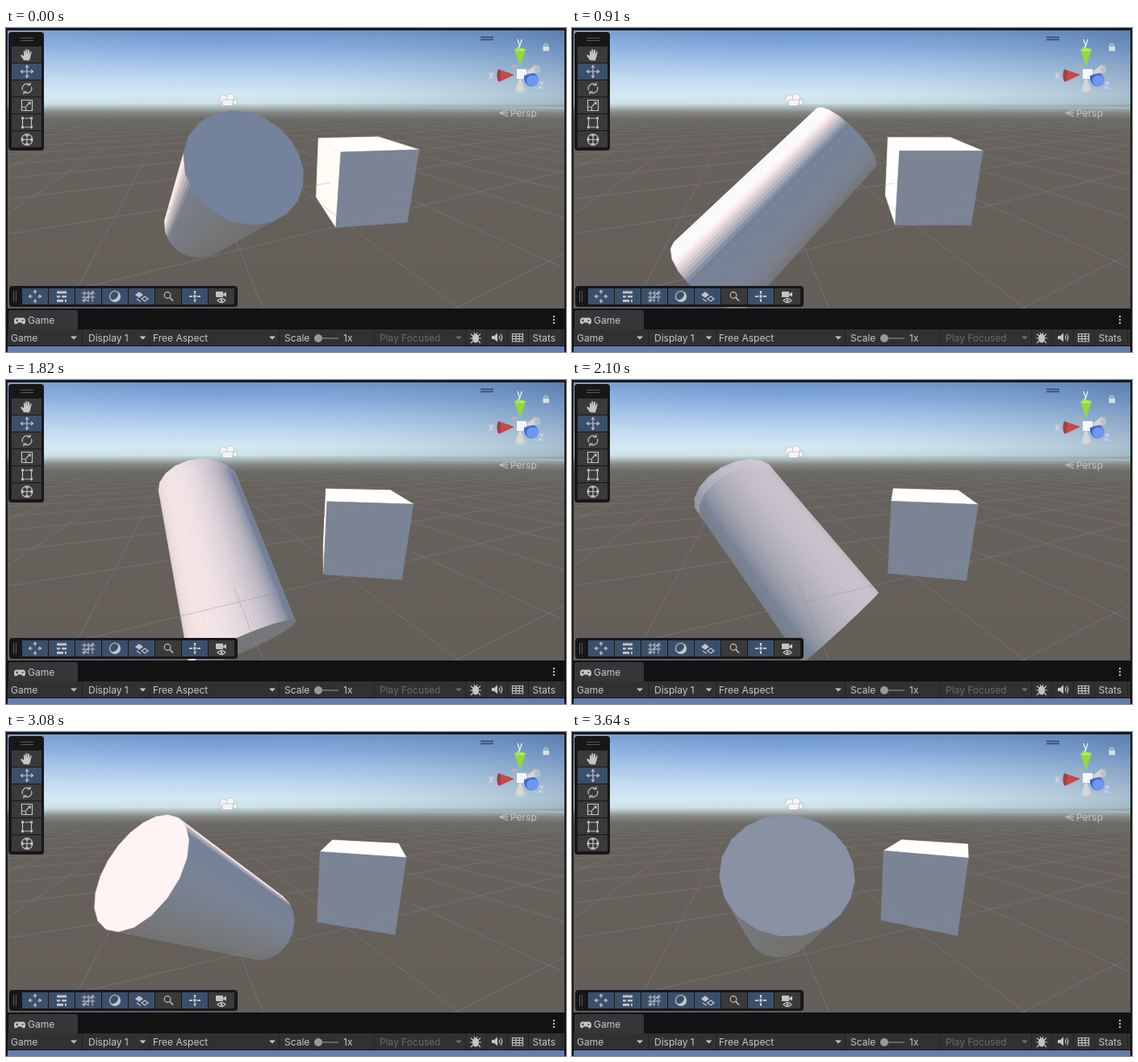
These frames come from a looping animation (694 px wide and 402 px high, 3.71 s). An HTML page with a canvas:

```html
<!DOCTYPE html>
<html lang="en">
<head>
<meta charset="utf-8">
<title>Scene view</title>
<style>
  html, body { margin: 0; width: 694px; height: 402px; overflow: hidden; background: #191919; }
  canvas, svg { position: absolute; left: 0; top: 0; display: block; }
  text { font: 12px Inter, Roboto, sans-serif; fill: #c8c8c8; }
  .i { fill: none; stroke: #c4c4c4; stroke-width: 1.2; }
  .s { fill: #c4c4c4; stroke: none; }
</style>
</head>
<body>
<canvas id="view" width="694" height="402"></canvas>
<svg id="ui" width="694" height="402" viewBox="0 0 694 402">
  <!-- camera icon -->
  <g fill="#f4f4f4" stroke="#9aa3a8" stroke-width=".5">
    <path d="M280 91l6-3v8l-6-3z"/>
    <circle cx="270" cy="88" r="5.2"/><circle cx="278" cy="86" r="4.6"/>
    <rect x="268" y="89" width="13" height="7.5" rx="1.5"/>
  </g>

  <!-- orientation gizmo -->
  <path d="M588 11.5h16M588 14.5h16" stroke="#3c4650" stroke-width="1.3"/>
  <path d="M637 57l-12-9 5-4z" fill="#aab2b4"/>
  <path d="M641 57l15-11q6 2 6 9z" fill="#d2d4d2"/><ellipse cx="658.500" cy="51" rx="3.500" ry="5" fill="#bcc0be"/>
  <path d="M637 60l-6 17q6 5 12 0z" fill="#d6d6d4"/>
  <path d="M630 58l-20-7q-3 8 1 16z" fill="#c04c48"/><ellipse cx="611" cy="59" rx="2.500" ry="7.500" fill="#a53f3e"/>
  <path d="M637 47l-7-20q7-3 14 0z" fill="#93d83c"/><ellipse cx="637" cy="27" rx="6.800" ry="2" fill="#a9ee52"/>
  <rect x="633" y="51" width="12" height="12" fill="#f6f6f4"/>
  <path d="M642 59l12-3q7 4 5 11-3 7-11 5-7-4-6-13z" fill="#3d68c8"/><ellipse cx="652.500" cy="65.500" rx="7.500" ry="7" fill="#7096f4"/>
  <text x="633" y="22" style="fill:#fff;font-size:13px">y</text>
  <text x="598" y="63" style="fill:#f3d5d2;font-size:13px">x</text>
  <text x="659.500" y="75" style="fill:#cfdcff;font-size:13px">z</text>
  <rect x="665.500" y="23" width="7.500" height="5.500" fill="#d7dfe5"/><path d="M667 23v-2q2-3 4 0v2" fill="none" stroke="#d7dfe5" stroke-width="1.200"/>
  <path d="M622 101.500l-10 4 10 4M612 105.500h10" class="i" style="stroke:#c2c2be"/>
  <text x="625" y="109.500" style="fill:#c6c5c2">Persp</text>

  <!-- tool column -->
  <rect x="3" y="5" width="44" height="147" rx="4" fill="#171718"/>
  <path d="M18 12.500h16M18 15.500h16" stroke="#5c5c5c"/>
  <g id="col"></g>
  <g class="i">
    <path class="s" d="M22 40l-4-6 1.500-1 2.500 2v-6.500h1.800v4.500l.7-6.500h1.800v6l1-5.500h1.700v6l1.200-4 1.500.4-1.500 7-1.500 4z"/>
    <path d="M26 47v14M19 54h14M24 49l2-2.500 2 2.500M24 59l2 2.500 2-2.500M21 52l-2.500 2 2.500 2M31 52l2.500 2-2.500 2"/>
    <path d="M20.500 77a5.800 5.800 0 0 1 9-6.500M31.500 73a5.800 5.800 0 0 1-9 6.500M30 67.500v3.500h-4M22 82.500v-3.500h4"/>
    <path d="M19.500 89.500h13v13h-13zM19.500 98h5v4.500M25 97l5-5M27 92h3v3"/>
    <path d="M22.500 112h7M22.500 123h7M20.500 114v7M31.500 114v7"/>
    <path class="s" d="M19 110.500h3v3h-3zM30 110.500h3v3h-3zM19 121.500h3v3h-3zM30 121.500h3v3h-3z"/>
    <circle cx="26" cy="138.500" r="6.800"/><path d="M26 132v13M19.500 138.500h13M24 134l2-2 2 2M24 143l2 2 2-2M21.500 136.500l-2 2 2 2M30.500 136.500l2 2-2 2"/>
  </g>

  <!-- overlay bar -->
  <rect x="4" y="320" width="283" height="26" rx="4" fill="#171718"/>
  <path d="M9.500 326v14M12.500 326v14" stroke="#5c5c5c"/>
  <g id="row"></g>
  <g class="i">
    <path d="M36 326v4M36 336v4M29 333h4M39 333h4M34 328l2-2.500 2 2.500M34 338l2 2.500 2-2.500M31 331l-2.500 2 2.500 2M41 331l2.500 2-2.500 2"/>
    <path class="s" d="M63 326.500h12v3h-12zM63 332h4v2.500h-4zM69 332h6v2.500h-6zM63 337h8v3h-8zM73 337h2v3h-2z"/>
    <path d="M97 326v14M102 326v14M107 326v14M94 329h16M94 334h16M94 338h8M95 340l14-14" stroke-width="1"/>
    <circle cx="135" cy="333" r="6.500"/><path class="s" d="M138 327.500a6.500 6.500 0 0 1-8.500 9 6.500 6.500 0 1 0 8.500-9z"/>
    <path d="M161 331l4-3 4 3-4 3zM168 336l4-3 4 3-4 3zM162 336l5 3.500"/><path class="s" d="M161 331l4-3 4 3-4 3z"/>
    <circle cx="200" cy="331.500" r="3.800"/><path d="M203 334.500l4 4" stroke-width="1.700"/>
    <path d="M234 326v4M234 336v4M227 333h4M237 333h4" stroke-width="2.200"/><circle class="s" cx="234" cy="333" r="2"/>
    <path class="s" d="M260 327h9v7h-9zM269 330l4-2.500v6l-4-2z"/>
    <path d="M262 338q5-5 10 0-5 5-10 0z" style="fill:#3a3a3a"/><circle class="s" cx="267" cy="338" r="1.500"/>
  </g>

  <!-- game panel -->
  <rect y="348" width="694" height="54" fill="#121213"/>
  <path d="M3 374v-21q0-3 3-3h80q3 0 3 3v21z" fill="#363637"/>
  <path class="s" d="M13 359.500h8q3 0 3 4 0 4-2 4-1.500 0-3-2h-4q-1.500 2-3 2-2 0-2-4 0-4 3-4z"/>
  <path d="M12 363h3M13.500 361.500v3" stroke="#363637"/><circle cx="20.500" cy="363" r="1" fill="#363637"/>
  <text x="27" y="367">Game</text>
  <g class="s"><circle cx="679" cy="358" r="1.200"/><circle cx="679" cy="362" r="1.200"/><circle cx="679" cy="366" r="1.200"/></g>
  <rect x="2" y="374" width="690" height="20" fill="#313132"/>
  <path d="M94.500 374v20M178.500 374v20M338.500 374v20M456.500 374v20M569.500 374v20M595.500 374v20M621.500 374v20M647.500 374v20M688.500 374v20" stroke="#232324"/>
  <text x="6" y="388.500">Game</text>
  <text x="102" y="388.500">Display 1</text>
  <text x="182" y="388.500">Free Aspect</text>
  <text x="345" y="388.500">Scale</text>
  <text x="418" y="388.500">1x</text>
  <text x="463" y="388.500" style="fill:#6c6c6c">Play Focused</text>
  <text x="652.500" y="388.500">Stats</text>
  <path class="s" d="M80 382.500h8l-4 4zM165.500 382.500h8l-4 4zM326 382.500h8l-4 4z"/>
  <path d="M557 382.500h8l-4 4z" fill="#6c6c6c"/>
  <path d="M387 385h25" stroke="#666" stroke-width="2"/><circle cx="387" cy="385" r="5" fill="#999"/>
  <ellipse class="s" cx="582" cy="385" rx="4" ry="5.500"/>
  <path class="i" d="M576 379.500l3 3M588 379.500l-3 3M575 385h14M576 391l3-3M588 391l-3-3M580 378l1 2M584 378l-1 2"/>
  <path class="s" d="M602 382h3l4-3.500v11l-4-3.500h-3z"/><path class="i" d="M611 381.500q2 2.500 0 5M613 379.500q3.500 4.500 0 9"/>
  <path class="i" d="M627.500 379.500h13v9.500h-13zM627.500 382.500h13M627.500 385.700h13M632 379.500v9.500M636 379.500v9.500"/>
  <rect x="2" y="395" width="690" height="7" fill="#647fae"/>
</svg>
<script>
const W = 694, H = 402, STEP = 70, LOOP = 3710;
const FOCAL = 299, CX = 347, CY = 175, PITCH = 16.75 * Math.PI / 180;
const GROUND = -1.126;
const CYL = [-0.75, GROUND, 2.51], CUBE = [1.072, GROUND, 3.335];
const LIGHT = [-0.513, 0.766, 0.388];
const { sin, cos, max, min, floor, PI } = Math;
const rad = d => d * PI / 180;

const ctx = document.getElementById('view').getContext('2d');
const dot = (a, b) => a[0] * b[0] + a[1] * b[1] + a[2] * b[2];
const add = (a, b, k = 1) => a.map((v, i) => v + k * b[i]);
const mix = (a, b, k) => a.map((v, i) => v + (b[i] - v) * k);
const rgb = c => `rgb(${c.map(v => Math.round(max(0, min(255, v)))).join()})`;

function project([x, y, z]) {
  const d = z * cos(PITCH) - y * sin(PITCH);
  return [CX + FOCAL * x / d, CY - FOCAL * (y * cos(PITCH) + z * sin(PITCH)) / d, d];
}

// ambient by height of the normal, plus the sun in linear light
function shade(n) {
  const amb = add([122, 132, 148], n[1] > 0 ? [-10, -2, 11] : [8, 22, 45], n[1]);
  const sun = max(0, dot(n, LIGHT));
  return amb.map((v, i) => 255 * min(1, (v / 255) ** 2.2 + [2.1, 1.6, 1.35][i] * sun) ** (1 / 2.2));
}

// part of a polygon above (side 1) or below (side -1) the ground plane
function cut(pts, side) {
  const out = [], h = p => side * (p[1] - GROUND);
  pts.forEach((p, i) => {
    const q = pts[(i + 1) % pts.length], a = h(p), b = h(q);
    if (a >= 0) out.push(p);
    if (a * b < 0) out.push(mix(p, q, a / (a - b)));
  });
  return out;
}

function fill({ pts, color }, side) {
  const part = cut(pts, side);
  if (part.length < 3) return;
  ctx.beginPath();
  part.forEach(p => { const s = project(p); ctx.lineTo(s[0], s[1]); });
  ctx.closePath();
  ctx.fillStyle = ctx.strokeStyle = rgb(color);
  ctx.lineWidth = 0.6;
  ctx.fill();
  ctx.stroke();
}

function cubeFaces(t) {
  const a = rad(7.85 - 8.83 * t);
  const ax = [[cos(a), 0, sin(a)], [0, 1, 0], [-sin(a), 0, cos(a)]];
  const faces = [];
  ax.forEach((n, i) => [1, -1].forEach(s => {
    const p = ax[(i + 1) % 3], q = ax[(i + 2) % 3];
    const mid = add(CUBE, n, s / 2), norm = n.map(v => v * s);
    if (dot(norm, mid) > 0) return;
    const pts = [[1, 1], [1, -1], [-1, -1], [-1, 1]].map(([j, k]) => add(add(mid, p, j / 2), q, k / 2));
    faces.push({ pts, color: shade(norm) });
  }));
  return faces;
}

function cylFaces(t) {
  const th = rad(36 + 95.05 * t), c = cos(rad(38)), s = sin(rad(38)), N = 20, SUB = 5;
  const u = [c * sin(th), s, -c * cos(th)];
  const w = [cos(th), 0, sin(th)], v = [-s * sin(th), c, s * cos(th)];
  const dir = a => w.map((k, i) => k * cos(a) + v[i] * sin(a));
  const rim = i => dir(2 * PI * i / N);
  const at = (d, h) => add(add(CYL, u, h), d, 0.5);
  const glow = 0.35 * max(0, min(1, (dot(u, LIGHT) - 0.9) * 14));
  const faces = [];
  for (let i = 0; i < N; i++) {
    const flat = rim(i + 0.5);
    if (dot(flat, at(flat, 0)) + 0.5 * (cos(PI / N) - 1) > 0) continue;
    for (let j = 0; j < SUB; j++) {
      const a = mix(rim(i), rim(i + 1), j / SUB), b = mix(rim(i), rim(i + 1), (j + 1) / SUB);
      const color = shade(rim(i + (j + 0.5) / SUB));
      faces.push({ pts: [at(a, -1), at(a, 1), at(b, 1), at(b, -1)], color });
      if (glow) faces.push({ pts: [at(a, 0.9), at(a, 1), at(b, 1), at(b, 0.9)], color: mix(color, [205, 206, 218], glow) });
    }
  }
  [1, -1].forEach(h => {
    const n = u.map(k => k * h);
    if (dot(n, add(CYL, n)) < 0)
      faces.push({ pts: Array.from({ length: N }, (_, i) => at(rim(i), h)), color: shade(n) });
  });
  return faces;
}

function layer(paint) {
  const c = document.createElement('canvas');
  c.width = W; c.height = H;
  paint(c.getContext('2d'));
  return c;
}

const sky = layer(g => {
  const ramp = (x, y, stops) => {
    const r = g.createLinearGradient(0, 0, x, y);
    stops.forEach(([p, c]) => r.addColorStop(p / max(x, y), c));
    g.fillStyle = r;
  };
  ramp(0, 348, [[0, '#6690c8'], [22, '#82a8da'], [45, '#a4c4e8'], [65, '#c2daf0'], [82, '#d4e8f2'],
    [93, '#cce2e6'], [99, '#a9b9b9'], [105, '#858785'], [113, '#6c6964'], [130, '#68625d'], [348, '#645e58']]);
  g.fillRect(0, 0, W, 348);
  ramp(W, 0, [[0, 'rgba(225,235,255,.16)'], [260, 'rgba(200,220,240,0)'], [W, 'rgba(40,70,100,.26)']]);
  g.fillRect(0, 0, W, 98);
});

const grid = layer(g => {
  const a = rad(23.2), e = [cos(a), 0, sin(a)], f = [-sin(a), 0, cos(a)], R = 32;
  g.lineWidth = 1;
  [[e, f], [f, e]].forEach(([along, across]) => {
    for (let i = -R; i <= R; i++) for (let j = -R; j < R; j += 0.5) {
      const base = add(CYL, across, i);
      const p = project(add(base, along, j)), q = project(add(base, along, j + 0.5));
      if (p[2] < 0.3 || q[2] < 0.3) continue;
      g.strokeStyle = `rgba(142,142,140,${0.5 * Math.exp(-p[2] / 9)})`;
      g.beginPath();
      g.moveTo(p[0], p[1]);
      g.lineTo(q[0], q[1]);
      g.stroke();
    }
  });
});

function draw(t) {
  ctx.fillStyle = '#19191b';
  ctx.fillRect(0, 0, W, H);
  ctx.save();
  ctx.beginPath();
  ctx.rect(2, 3, 690, 345);
  ctx.clip();
  ctx.drawImage(sky, 0, 0);
  const faces = [...cubeFaces(t), ...cylFaces(t)];
  faces.forEach(f => fill(f, -1));
  ctx.drawImage(grid, 0, 0);
  faces.forEach(f => fill(f, 1));
  ctx.restore();
}

const button = (x, y, w, h, on) => `<rect x="${x}" y="${y}" width="${w}" height="${h}" fill="${on ? '#3b4f6b' : '#3a3a3a'}"/>`;
const each = (n, fn) => Array.from({ length: n }, (_, i) => fn(i)).join('');
document.getElementById('col').innerHTML = each(6, i => button(7, 23 + 21 * i, 37, 20, i === 1));
document.getElementById('row').innerHTML = each(8, i => button(20 + 33 * i, 323, 32, 20, i !== 5 && i !== 7));

let start, last = -1;
function tick(now) {
  start ??= now;
  const step = floor(((now - start) % LOOP) / STEP);
  if (step !== last) draw((last = step) * STEP / 1000);
  requestAnimationFrame(tick);
}
draw(0);
requestAnimationFrame(tick);
</script>
</body>
</html>
```
